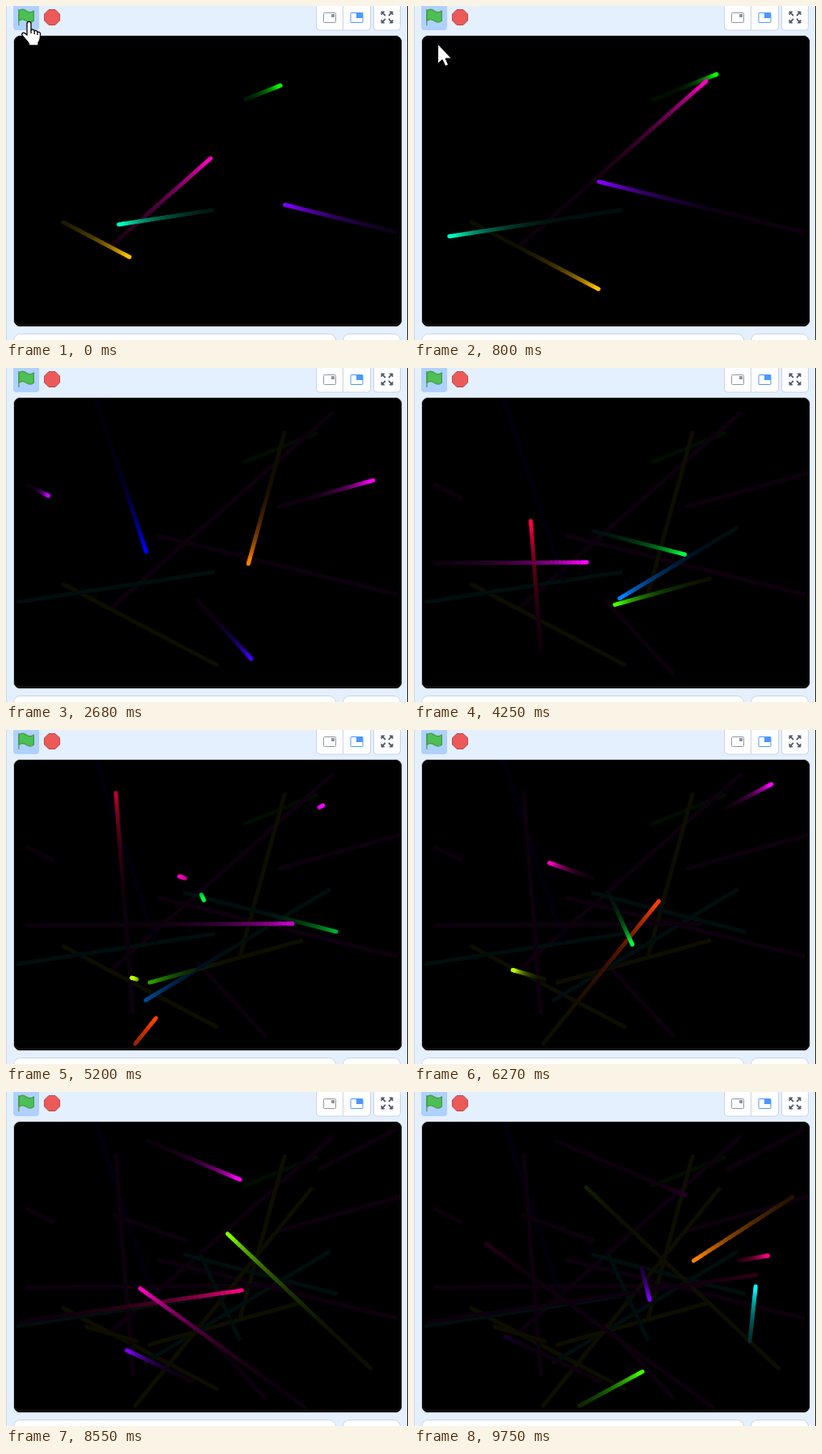
These frames come from a looping animation (498x414 px, 9850 ms). An HTML page with a canvas:

```html
<!DOCTYPE html>
<html lang="en">
<head>
<meta charset="utf-8">
<title>Fading streaks</title>
<style>
  html, body { margin: 0; width: 100%; height: 100%; overflow: hidden; background: #e5f0ff; }
  svg, canvas { position: absolute; display: block; }
  svg { left: 0; top: 0; }
  canvas { left: 10px; top: 37px; border-radius: 8px; background: #000; box-shadow: inset 0 -3px #140d0d; }
  .box { fill: #fff; stroke: #c9d4e4; }
  .cursor { fill: #fff; stroke: #000; stroke-linejoin: round; }
</style>
</head>
<body>
<svg width="498" height="414" viewBox="0 0 498 414">
  <path d="M.5 0V414" stroke="#cbd6e6"/>
  <path d="M497.5 0V414" stroke="#222"/>
  <rect x="9" y="-4" width="32" height="34" rx="4" fill="#afd1ff"/>
  <g transform="translate(15 3.5) scale(1.2)" stroke="#45993d" stroke-linecap="round" stroke-linejoin="round">
    <path fill="#4cbf56" d="M.75 2A6.44 6.44 0 0 1 8.44 2A6.44 6.44 0 0 0 16.13 2V12.4A6.44 6.44 0 0 1 8.44 12.4A6.44 6.44 0 0 0 .75 12.4Z"/>
    <path d="M.75 16.75V.75"/>
  </g>
  <path d="M53 4.5H61L66.5 10V18L61 23.5H53L47.5 18V10Z" fill="#ec5959" stroke="#b84848" stroke-linejoin="round"/>

  <rect class="box" x="384.5" y="-5.5" width="67" height="35.5" rx="4"/>
  <path d="M417.5 0V30" stroke="#c9d4e4"/>
  <rect x="393.5" y="8.5" width="15" height="12" rx="1" fill="none" stroke="#8f949f"/>
  <path d="M403 10H407V14H403Z" fill="#8f949f"/>
  <rect x="427" y="8.5" width="15" height="12" rx="1" fill="none" stroke="#4c97ff"/>
  <path d="M434 8.5H442V15H434Z" fill="#4c97ff"/>
  <rect class="box" x="455.5" y="-5.5" width="33" height="35.5" rx="4"/>
  <g id="arrows" fill="#575e75" stroke="#575e75" stroke-width="1.8"></g>

  <rect class="box" x="9.5" y="406.5" width="399" height="30" rx="8"/>
  <rect class="box" x="417.5" y="406.5" width="71" height="30" rx="8"/>
  <rect x="9.5" y="36.5" width="481" height="361" rx="8.5" fill="#000" stroke="#c3ccd9"/>
</svg>
<canvas id="stage" width="480" height="360"></canvas>
<svg width="498" height="414" viewBox="0 0 498 414">
  <g id="hand" class="cursor" stroke-width="1.3">
    <path d="M26 22C26 18.500 31 18.500 31 22V30C32 28.500 35 29 35.200 31C36.500 29.800 39 30.500 39 32.500C40.500 31.500 43 32.500 42.500 35.500C42.500 40 42 43 40 45.500V49H28.500V46.500C26 43.500 23 40 20.500 37C18.500 34.500 21 32 23.500 33.700L26 36Z"/>
    <path d="M31 30V34M35.200 31V35M39 32.500V36" fill="none"/>
  </g>
  <path id="arrow" class="cursor" d="M31 63V87.500L36.500 82.500L40.300 90.500L44 88.800L40.500 81H47.800Z"/>
</svg>
<script>
const LOOP = 9850, BEAT = 135, TICK = 33;
const FIRST = -1000, PERIOD = 1985, STAGGER = 34, LIFE = 2000, PER_BATCH = 5;
const DECAY = 2.6, RESIDUE = 14;

// Colour wheel in steps of 15 degrees
const wheel = ('red scarlet orange gold yellow lemon lime leaf green emerald mint teal ' +
  'cyan sky azure cobalt blue indigo violet purple magenta fuchsia rose crimson').split(' ');

// Where each streak starts and where it heads
const paths = [
  ['green', 296, 116, 384, 81],
  ['teal', 256, 253, 15, 290],
  ['violet', 482, 280, 189, 208],
  ['fuchsia', 131, 297, 404, 56],
  ['gold', 71, 268, 261, 368],

  ['blue', 111, 38, 185, 262],
  ['purple', 26, 145, 58, 161],
  ['orange', 345, 80, 290, 280],
  ['indigo', 237, 288, 321, 379],
  ['magenta', 338, 172, 488, 130],

  ['azure', 400, 198, 173, 335],
  ['leaf', 366, 261, 178, 313],
  ['emerald', 222, 202, 409, 250],
  ['crimson', 157, 350, 136, 78],
  ['magenta', 26, 242, 355, 240],

  ['scarlet', 160, 389, 378, 120],
  ['lemon', 162, 309, 100, 291],
  ['fuchsia', 222, 184, 135, 153],
  ['emerald', 242, 204, 289, 306],
  ['magenta', 388, 96, 481, 47],

  ['lime', 452, 343, 213, 118],
  ['fuchsia', 371, 391, 89, 188],
  ['magenta', 177, 61, 336, 128],
  ['violet', 232, 359, 113, 303],
  ['rose', 18, 285, 424, 227],

  ['rose', 403, 209, 489, 194],
  ['orange', 469, 130, 159, 330],
  ['leaf', 205, 389, 411, 277],
  ['cyan', 416, 309, 436, 121],
  ['violet', 282, 218, 311, 333]
];

const clamp = (v, lo = 0, hi = 1) => Math.min(hi, Math.max(lo, v));
const lerp = (a, b, p) => a + (b - a) * p;
const rgb = hue => [0, 4, 2].map(n => 255 * clamp(Math.abs((hue / 60 + n) % 6 - 3) - 1));

const streaks = paths.map(([name, x0, y0, x1, y1], i) => {
  const born = FIRST + Math.floor(i / PER_BATCH) * PERIOD + i % PER_BATCH * STAGGER;
  return {
    born,
    color: rgb(wheel.indexOf(name) * 15),
    point(t) {
      const p = clamp((t - born) / LIFE);
      return [lerp(x0, x1, p), lerp(y0, y1, p)];
    }
  };
});

// The picture holds between beats, spaced evenly from one key time to the next
const keys = [0, 1590, 2680, 4250, 6270, 7500, 9750, LOOP];
function heldTime(t) {
  const i = keys.findIndex(k => k > t);
  const from = keys[i - 1], span = keys[i] - from;
  const step = span / Math.max(1, Math.round(span / BEAT));
  return from + Math.floor((t - from) / step) * step;
}

const el = id => document.getElementById(id);
const ctx = el('stage').getContext('2d');
ctx.translate(-10, -37);
ctx.lineWidth = 5;
ctx.lineCap = 'round';

// Every channel dims with age but never falls below a faint residue
function faded(color, age) {
  const k = Math.exp(-DECAY * age / 1000);
  return `rgb(${color.map(c => Math.round(Math.max(Math.min(c, RESIDUE), c * k)))})`;
}

function drawStage(now) {
  ctx.clearRect(10, 37, 480, 360);
  for (let t = FIRST; t < now; t += TICK) {
    const end = Math.min(t + TICK, now);
    for (const s of streaks) {
      const died = s.born + LIFE;
      if (end <= s.born || t >= died) continue;
      ctx.strokeStyle = faded(s.color, now - Math.min(end, died));
      ctx.beginPath();
      ctx.moveTo(...s.point(t));
      ctx.lineTo(...s.point(end));
      ctx.stroke();
    }
  }
}

function drawCursor(now) {
  const move = clamp((now - 540) / 400);
  const onFlag = move < 0.3;
  el('hand').style.display = onFlag ? '' : 'none';
  el('hand').setAttribute('transform', `translate(${4 * move} ${44 * move})`);
  el('arrow').style.display = onFlag || now > 1900 ? 'none' : '';
  el('arrow').setAttribute('transform', `translate(${4 * (move - 1)} ${44 * (move - 1)})`);
}

el('arrows').innerHTML = [0, 90, 180, 270].map(a =>
  `<g transform="translate(472 14) rotate(${a})"><path d="M2 -2L5.5 -5.5"/><path d="M7 -7V-3L3 -7Z" stroke-width="1"/></g>`).join('');

let shown = -1;
const start = performance.now();
function frame() {
  const now = heldTime((performance.now() - start) % LOOP);
  if (now !== shown) {
    shown = now;
    drawStage(now);
    drawCursor(now);
  }
  requestAnimationFrame(frame);
}
frame();
</script>
</body>
</html>
```
